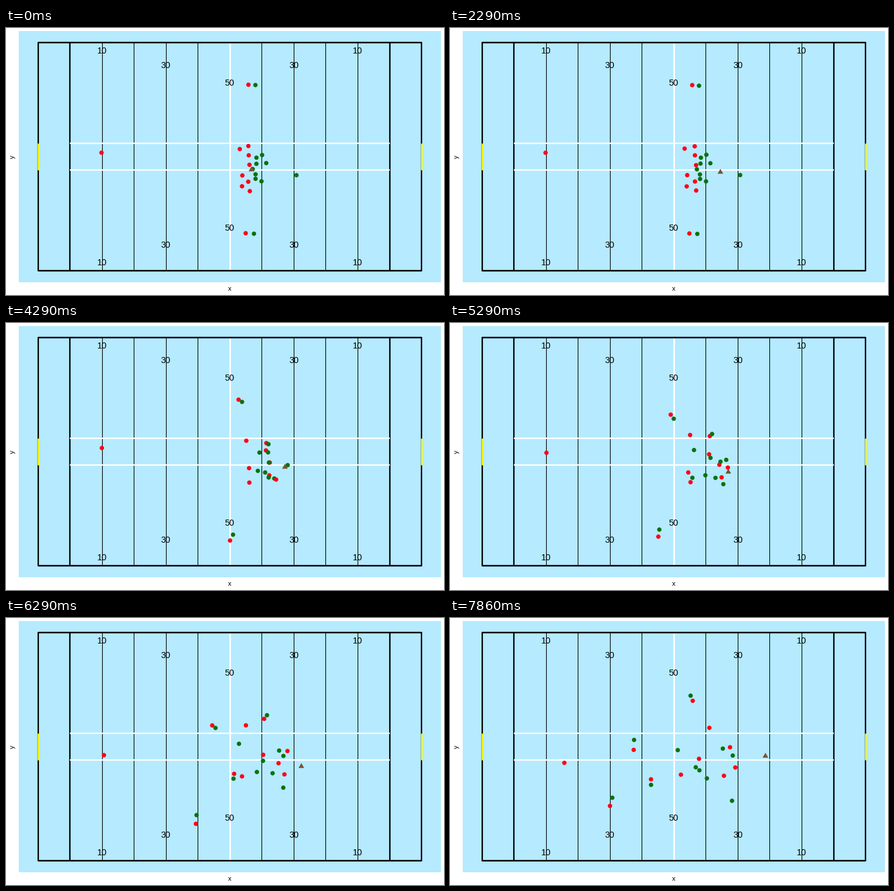
Animation of 720 by 440 pixels, one loop 8 s. Source, as a matplotlib script:

```python
import numpy as np
import matplotlib.pyplot as plt
from matplotlib.animation import FuncAnimation

W, H, DPI = 720, 440, 100
PX = 72 / DPI                      # one pixel in points
FRAMES, LOOP_MS = 56, 8000
RED, GREEN, BROWN = "#ff0016", "#0a720f", "#7b5534"
FONT = "Liberation Sans"
SNAP, CONTACT, SET, KICK, LAST = 16, 23, 30, 44, 55

# Points at the start, SET, KICK and LAST; a fifth one, placed second, is at CONTACT.
WIDE_RED = [
    [(398.5, 93.5), (382.3, 126.3), (339, 177), (302, 217.3)],
    [(394, 338.2), (368.3, 358.5), (312.2, 339.2), (263, 309.7)],
]
WIDE_GREEN = [
    [(410, 94), (388, 130), (344.4, 181.2), (302.6, 200.9)],
    [(407.6, 339), (373.2, 348.8), (313.2, 324.8), (266.8, 296.2)],
    [(477.4, 242.6), (463, 234.2), (449, 218.5), (448.5, 215.2)],
]
RUSH = [
    [(157, 205.5), (157.6, 206), (161, 226), (188, 238.7)],
    [(384.3, 199.5), (395, 194), (394.4, 176.9), (426.3, 181)],
    [(398.4, 194.5), (428, 197.9), (424.4, 166.2), (399, 136.4)],
    [(399, 209.8), (427.3, 210), (422.7, 225.4), (409.3, 232)],
    [(400.2, 225.4), (433.6, 230), (448, 239.3), (450.3, 260)],
    [(388.5, 243), (399.6, 239.2), (375, 256.8), (330.4, 265.8)],
    [(398.2, 253.3), (432.8, 251), (457.7, 257.7), (469, 246.3)],
]
BLOCK = [
    [(411.7, 213.7), (430.8, 213.2), (422.5, 235.4), (404, 246)],
    [(421, 209.3), (431.4, 199.7), (429, 160.2), (395.5, 128)],
    [(411.6, 223.8), (418.5, 219.5), (416.7, 213.5), (383, 207.3), (374.4, 217.7)],
    [(427.8, 222.6), (424, 230.8), (432.2, 230), (456, 227.3), (464.8, 226.7)],
    [(405.5, 232.4), (417.5, 231.3), (414, 243.6), (374, 264.8), (330.5, 275)],
    [(410.2, 241.1), (426, 246.3), (412.4, 253.8), (410, 251)],
    [(410.2, 248.5), (431.8, 254.6), (438.2, 255.8), (422.3, 264.3)],
    [(420, 252.6), (441, 256.2), (455.8, 279.6), (463.6, 301.2)],
]
EDGE = [
    [(388, 260.8), (400, 263), (388, 261), (379.6, 258.2)],
    [(400.8, 268.8), (444, 258), (462.7, 219.2), (460.3, 213)],
]

# Colour, and the share of the way to SET covered by SNAP and by CONTACT.
GROUPS = [(WIDE_RED, RED, 0.02, 0.34), (RUSH, RED, 0.13, 0.55),
          (WIDE_GREEN, GREEN, 0.03, 0.31), (BLOCK, GREEN, 0.04, 0.4),
          (EDGE, RED, 0.09, 0.49)]

BALL_KEYS = [0, 11.5, 19.5, CONTACT, SET, 37, KICK, LAST]
BALL = [(403.3, 232.8), (403.5, 233), (472, 239.5), (469.7, 240),
        (458, 236.8), (456.8, 245), (484.7, 244), (518.3, 227)]


def glide(keys, vals, t):
    """Smooth interpolation that never overshoots its key values."""
    k, v = np.array(keys, float), np.array(vals, float)
    h = np.diff(k)
    d = np.diff(v) / h
    m = np.zeros(len(v))
    m[-1] = d[-1]
    for i in range(1, len(v) - 1):
        if d[i - 1] * d[i] > 0:
            w1, w2 = 2 * h[i] + h[i - 1], h[i] + 2 * h[i - 1]
            m[i] = (w1 + w2) / (w1 / d[i - 1] + w2 / d[i])
    i = np.clip(np.searchsorted(k, t, side="right") - 1, 0, len(h) - 1)
    s = (t - k[i]) / h[i]
    return ((1 + 2 * s) * (1 - s) ** 2 * v[i] + s * (1 - s) ** 2 * h[i] * m[i]
            + s * s * (3 - 2 * s) * v[i + 1] + s * s * (s - 1) * h[i] * m[i + 1])


def track(keys, points):
    t = np.arange(FRAMES)
    return [glide(keys, axis, t) for axis in np.transpose(points)]


def run(points, early, mid):
    p = np.array(points)
    start, rest = p[0], p[-3:]
    lean = rest[0] - start
    contact = p[1] if len(p) == 5 else start + mid * lean
    snap = start + early * lean
    return track([0, SNAP, CONTACT, SET, KICK, LAST], [start, snap, contact, *rest])


fig = plt.figure(figsize=(W / DPI, H / DPI), dpi=DPI, facecolor="white")
ax = fig.add_axes([0, 0, 1, 1])
ax.set(xlim=(0, W), ylim=(H, 0))
ax.axis("off")


def line(x, y, color, width, z):
    ax.plot(x, y, color=color, lw=width * PX, zorder=z, solid_capstyle="butt")


def label(x, y, text, size, **kw):
    ax.text(x, y, text, fontsize=size * PX, family=FONT, ha="center",
            va="center", color="black", zorder=5, **kw)


def yard(n):
    return 52.7 + 5.253 * n


def draw_field():
    top, bottom, left, right = 24.4, 400, yard(0), yard(120)
    ax.add_patch(plt.Rectangle((21.3, 5.5), 693.4, 413.4, color="#b5eaff", lw=0))
    for n in range(20, 110, 10):
        if n != 60:
            line([yard(n)] * 2, [top, bottom], "black", 1.1, 1)
    for n in (0, 10, 110, 120):
        line([yard(n)] * 2, [top - 1, bottom + 1], "black", 2.3, 2)
    for y in (top, bottom):
        line([left, right], [y, y], "black", 2.5, 3)
    line([yard(60)] * 2, [top + 1, bottom - 1], "white", 2.6, 2)
    for y in (190.5, 234):
        line([yard(10), yard(110)], [y, y], "white", 2.4, 3)
    for x in (left, right):
        line([x, x], [190.5, 234], "#ffff00", 2.6, 4)
    for n, up, down in ((10, 38.3, 387.3), (30, 62.3, 358.3), (50, 91.3, 330.3)):
        for x in {yard(n + 10), yard(110 - n)}:
            label(x, up, str(n), 14.4)
            label(x, down, str(n), 14.4)
    label(368, 430, "x", 11)
    label(10.5, 212, "y", 11, rotation=90)


draw_field()
tracks = np.array([run(p, early, mid) for group, _, early, mid in GROUPS for p in group])
colors = [color for group, color, _, _ in GROUPS for _ in group]
ball_x, ball_y = track(BALL_KEYS, BALL)

dots = ax.scatter(tracks[:, 0, 0], tracks[:, 1, 0], s=(7.2 * PX) ** 2,
                  c=colors, linewidths=0, zorder=6)
ball, = ax.plot([], [], marker=(3, 0, 0), ms=10.8 * PX, mew=0, color=BROWN, zorder=7)


def update(i):
    dots.set_offsets(tracks[:, :, i])
    ball.set_data([ball_x[i]], [ball_y[i]])
    return dots, ball


anim = FuncAnimation(fig, update, frames=FRAMES, interval=LOOP_MS / FRAMES,
                     repeat=True, repeat_delay=0)
plt.show()
```
